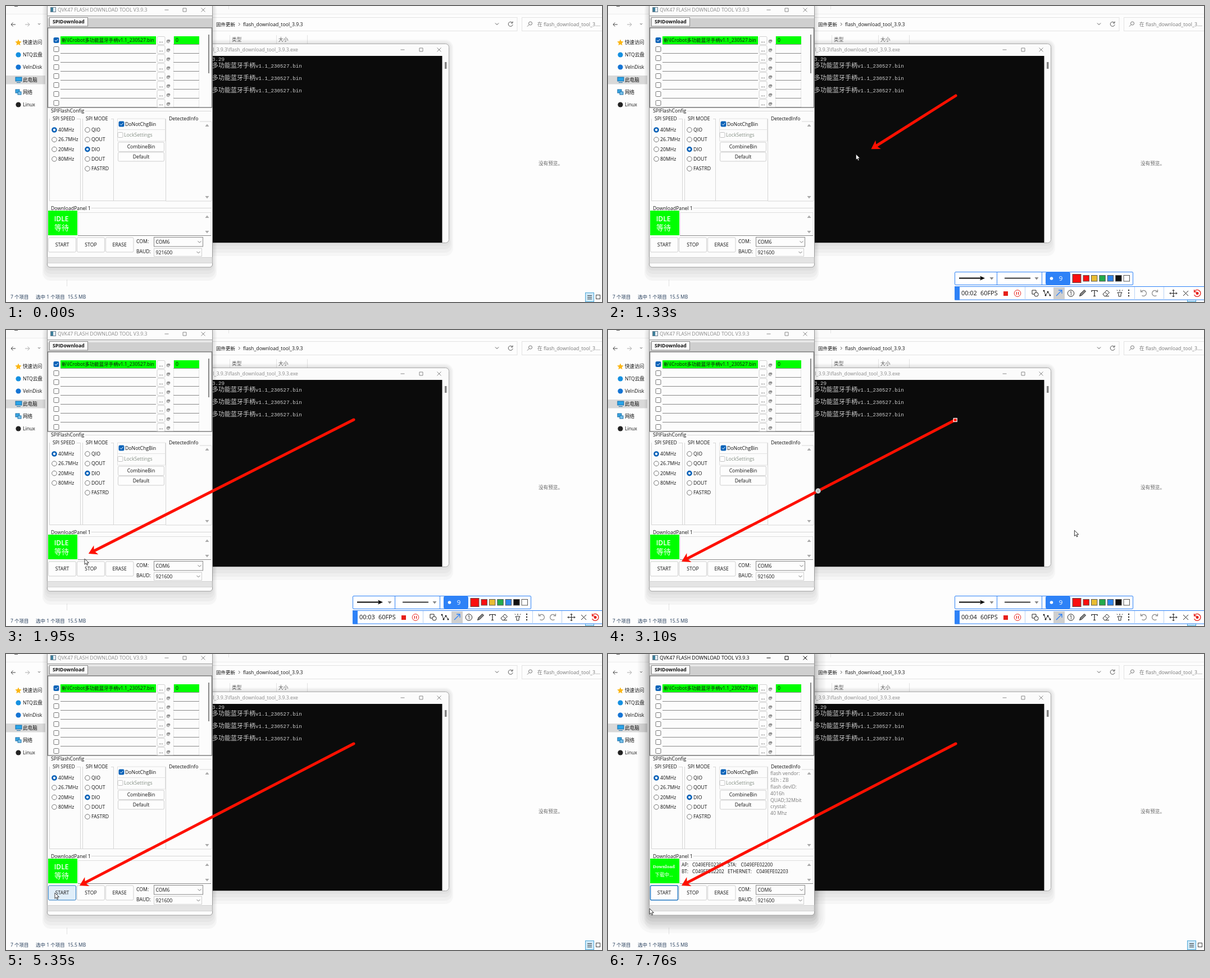
These frames come from a looping animation (1061x528 px, 8000 ms). An HTML page:

```html
<!DOCTYPE html>
<html lang="zh">
<head>
<meta charset="utf-8">
<title>Flash download</title>
<style>
html, body { margin: 0; width: 100%; height: 100%; overflow: hidden; background: #fdfdfd; }
svg { display: block; width: 100vw; height: 100vh; }
text { font-family: "Open Sans", "Noto Sans CJK SC", "Noto Sans CJK", sans-serif; white-space: pre; }
.mono { font-family: "Liberation Mono", "Noto Sans CJK SC", "Noto Sans CJK", monospace; }
.serif { font-family: "Noto Serif", "Noto Sans CJK SC", "Noto Sans CJK", serif; }
</style>
</head>
<body>
<svg id="stage" viewBox="0 0 1061 528"></svg>
<script>
const LOOP = 8000;
const RED = '#fe1000', BLUE = '#0a62b8', GREEN = '#00ff00', TOOL_BLUE = '#2e82f7';

// Drawing helpers; text is placed by its vertical centre.
const attrs = o => Object.entries(o).map(([k, v]) => ` ${k}="${v}"`).join('');
const rect = (x, y, w, h, fill = 'none', stroke = 'none', o = {}) =>
  `<rect${attrs({ x, y, width: w, height: h, fill, stroke, ...o })}/>`;
const text = (x, y, s, o = {}) => {
  const size = o['font-size'] || 8.7;
  return `<text${attrs({ x, y: y + size * 0.36, 'font-size': size, fill: '#111', ...o })}>${s}</text>`;
};
const path = (d, stroke = '#333', o = {}) =>
  `<path${attrs({ d, stroke, fill: 'none', 'stroke-width': 1, ...o })}/>`;
const dot = (x, y, r, fill, stroke = 'none', o = {}) =>
  `<circle${attrs({ cx: x, cy: y, r, fill, stroke, ...o })}/>`;
const group = (id, s, o = {}) => `<g${attrs({ id, ...o })}>${s}</g>`;
const range = n => [...Array(n).keys()];
const mid = { 'text-anchor': 'middle' };
const grey = { fill: '#777' };

const chevron = (x, y, c = '#555', r = 3) => path(`M${x - r} ${y - r / 2}l${r} ${r}l${r} ${-r}`, c);
const triangle = (x, y, dir, c = '#aaa') =>
  path(`M${x - 3.5} ${y + 2 * dir}h7l-3.5 ${-4.5 * dir}z`, 'none', { fill: c });
const windowButtons = (xs, y, c) =>
  path(`M${xs[0] - 3.5} ${y}h7M${xs[1] - 3} ${y - 3}h6v6h-6zM${xs[2] - 3.5} ${y - 3.5}l7 7m0 -7l-7 7`, c);
const shadow = (x, y, w, h, n, side, drop, alpha) => range(n).map(i => {
  const s = side * (i + 1), d = drop * (i + 1);
  return rect(x - s, y - s, w + 2 * s, h + s + d, '#000', 'none', { rx: 6 + s, 'fill-opacity': alpha });
}).join('');
const check = (x, y, on, c = '#666') =>
  rect(x - 4.5, y - 4.5, 9, 9, on ? BLUE : '#fff', on ? BLUE : c, { rx: 1.5, 'stroke-width': 0.9 }) +
  (on ? path(`M${x - 2.5} ${y}l2 2l3.5 -4`, '#fff') : '');
const radio = (x, y, label, on) =>
  dot(x, y, on ? 3.5 : 4.3, '#fff', on ? BLUE : '#666', { 'stroke-width': on ? 2.7 : 0.9 }) + text(x + 7, y, label);
const button = (x, y, w, h, label, id = '') =>
  rect(x, y, w, h, '#fdfdfd', '#cfcfcf', { rx: 2, id }) + text(x + w / 2, y + h / 2, label, mid);
const combo = (x, y, w, h, label, c) =>
  rect(x, y, w, h, '#fdfdfd', c) + text(x + 3, y + h / 2, label) + chevron(x + w - 6, y + h / 2, '#777');

function explorer() {
  const places = ['快速访问', 'NTQ云盘', 'VelnDisk', '此电脑', '网络', 'Linux'];
  const icons =
    path('M22 59.5l1.7 3.6l4 .5l-3 2.7l.8 4l-3.5 -2l-3.5 2l.8 -4l-3 -2.7l4 -.5z', 'none', { fill: '#fbb615' }) +
    dot(22, 87, 4.6, '#1590e0') + dot(22, 109, 4.6, '#1474d4') +
    rect(17, 127, 11, 7, '#2aa4e8', '#1b6fa8') + path('M19 136.5h7', '#1b6fa8') +
    rect(17, 149, 7, 6, '#39a7e4', '#1b6fa8') + rect(21, 153, 6, 5, '#7cc4ec', '#1b6fa8') +
    dot(22, 176, 4.6, '#222');
  return rect(0, 0, 1061, 528, '#fdfdfd') + rect(0, 0, 1061, 14, '#fbfbfb') + path('M0 14.5H1061', '#ececec') +
    rect(15, 0, 6, 1, '#555') + path('M396.5 0v6M108.5 488v12', '#e4e4e4') +
    path('M17 33H9m3.5 -3.5l-3.5 3.5l3.5 3.5', '#444') + path('M34 33h8m-3.5 -3.5l3.5 3.5l-3.5 3.5', '#aaa') + chevron(59, 32, '#666', 2) +
    rect(76, 20.5, 834, 24, '#fdfdfd', '#e2e2e2') + rect(918.5, 20.5, 150, 24, '#fdfdfd', '#e2e2e2') +
    text(374, 32.5, '固件更新', { 'font-size': 8.5 }) + path('M414 30l2.5 2.5l-2.5 2.5', '#555') +
    text(422, 32.5, 'flash_download_tool_3.9.3') + chevron(874, 32) +
    path('M901.5 30a4 4 0 1 0 .7 3M902 27.5v3h-3', '#555') +
    dot(933.5, 31, 3, 'none', '#777') + path('M931.3 33.3l-3.3 3.3', '#777') +
    text(946, 32.5, '在 flash_download_tool_3....', grey) +
    text(402, 60, '类型', { fill: '#555' }) + text(485, 60, '大小', { fill: '#555' }) +
    path('M398.5 52v16M481.5 52v16M536.5 52v16', '#e2e2e2') +
    rect(0, 124, 70, 15.5, '#d9d9d9') + icons +
    places.map((s, i) => text(30, 65 + 22.2 * i, s, { 'font-size': 8.6 })).join('') +
    text(948, 281, '没有预览。', { fill: '#666', 'font-size': 8.6 }) +
    ['7 个项目', '选中 1 个项目', '15.5 MB'].map((s, i) => text([8, 53, 110][i], 519, s, { fill: '#1c3554', 'font-size': 8.5 })).join('') +
    rect(1031.5, 511.5, 15, 16, '#cfe9f8', '#4fa8d8') + path('M1035 516.5h8m-8 3h8m-8 3h8', '#333') +
    rect(1050.5, 515.5, 7, 7, '#fff', '#444');
}

function consoleWindow() {
  const line = y => `<text class="mono" x="367" y="${y}" fill="#ccc" font-size="11">多功能蓝牙手柄<tspan font-size="9.2">v1.1_230527.bin</tspan></text>`;
  return shadow(300, 68, 488, 354, 4, 2, 6, 0.028) +
    rect(300, 67.5, 488.5, 355, '#fbfbfb', '#aaa', { rx: 6 }) + rect(300, 89, 476.5, 333, '#0b0b0b') +
    text(520, 78, 'l_3.9.3\\flash_download_tool_3.9.3.exe', { fill: '#888', 'text-anchor': 'end' }) +
    windowButtons([706, 739, 771], 78, '#888') + rect(781, 100, 3.5, 12, '#858585') +
    text(367, 95, '3.29', { class: 'mono', fill: '#ccc', 'font-size': 9.2 }) + [109.5, 131.5, 153.5].map(line).join('');
}

function fileRows() {
  return range(8).map(i => {
    const y = 61 + 16 * i;
    return check(89.5, y, i === 0) + path(`M97 ${y + 7.5}h170M298 ${y + 7.5}h46`, '#888') +
      path(`M298.5 ${y - 7}v14M343.5 ${y - 7}v14`, '#e4e4e4') +
      rect(269, y - 6.5, 14, 14, '#fdfdfd', '#d0d0d0', { rx: 2 }) + text(276, y + 0.5, '...', mid) +
      text(289, y + 1, '@', { ...mid, 'font-size': 8 });
  }).join('') + rect(97, 54, 170, 14, GREEN) + rect(299, 54, 45, 14, GREEN) +
    text(99, 61, '新\\ICrobot多功能蓝牙手柄v1.1_230527.bin', { 'font-size': 8.5 }) + text(302, 61, '0');
}

function toolWindow() {
  const speeds = ['40MHz', '26.7MHz', '20MHz', '80MHz'], modes = ['QIO', 'QOUT', 'DIO', 'DOUT', 'FASTRD'];
  const info = ['flash vendor:', '5Eh : ZB', 'flash devID:', '4016h', 'QUAD;32Mbit', 'crystal:', '40 Mhz'];
  const macs = [['AP:', 'C049EFE02201', 'STA:', 'C049EFE02200'], ['BT:', 'C049EFE02202', 'ETHERNET:', 'C049EFE02203']];
  const white = { ...mid, fill: '#fff' };
  const tab =
    rect(74, 17, 293, 22, '#cfcfcf') + path('M74 17.5h293', '#9a9a9a') + rect(74, 18, 293, 4, '#e8e8e8') +
    rect(77.5, 20.5, 68, 15.5, '#fafafa', '#8a8a8a') + text(83, 28, 'SPIDownload', { 'font-weight': 700 }) +
    `<clipPath id="list"><rect x="74" y="39" width="293" height="142"/></clipPath>` +
    rect(74.5, 39, 292, 142, '#fcfcfc', '#777', { 'stroke-width': 1.4 }) +
    `<g clip-path="url(#list)">${fileRows()}</g>` + rect(360, 51, 2, 69, '#888');
  const config =
    path('M141 187.5H366M77.5 201V347.5H285M132.5 201V347M136.5 201V347M191.5 201V347M284.5 201V348H366V206H345M126 201.5h6M187 201.5h4', '#d6d6d6') +
    text(80, 187, 'SPIFlashConfig') + text(83, 201, 'SPI SPEED', { 'font-size': 8.5 }) +
    text(142, 201, 'SPI MODE', { 'font-size': 8.5 }) + text(290, 201, 'DetectedInfo') +
    speeds.map((s, i) => radio(86, 221 + 17.3 * i, s, i === 0)).join('') +
    modes.map((s, i) => radio(145, 221 + 17.3 * i, s, i === 2)).join('') +
    path('M198.5 201h85v19.5h-85zM198.5 220.5h85V241h-85z', '#e2e2e2') +
    check(205.5, 210.5, true) + text(212, 210.5, 'DoNotChgBin') +
    check(203.5, 230, false, '#bbb') + text(210, 230, 'LockSettings', { fill: '#859085' }) +
    button(199.5, 243, 82, 16.5, 'CombineBin') + button(199.5, 261, 82, 16, 'Default') +
    triangle(358, 213, 1) + triangle(358, 341, -1) +
    group('info', info.map((s, i) => text(289, 213 + 11.85 * i, s, { fill: '#7a7a7a' })).join(''));
  const download =
    path('M152 360.5H366', '#d6d6d6') + text(80, 360.5, 'DownloadPanel 1') +
    rect(128.5, 368.5, 236.5, 41, '#fcfcfc', '#ddd') + path('M128 409.5H365', '#888') +
    triangle(358, 376, 1) + triangle(358, 403, -1) + rect(75, 365, 52, 44, GREEN) +
    group('idle', text(98.5, 380, 'IDLE', { ...white, 'font-size': 12, 'font-weight': 600 }) + text(99, 395, '等待', { ...white, 'font-size': 13 })) +
    group('sync', text(100.5, 380.5, 'SYNC', { ...white, 'font-size': 12, 'font-weight': 600 }) + text(101.5, 394, '等待上电同步', { ...mid, class: 'serif', 'font-size': 6.6 })) +
    group('loading', text(99.5, 379, 'Download', { ...white, class: 'serif', 'font-size': 7.6, 'font-weight': 600 }) + text(99.5, 394, '下载中...', { ...white, class: 'serif', 'font-size': 8.6 })) +
    group('macs', macs.map((row, r) => row.map((s, i) => text([131, 150, 213, r ? 264 : 236.5][i], 376.5 + 12 * r, s, { 'font-size': 8.3 })).join('')).join('')) +
    button(75.5, 413, 49, 26, 'START', 'start') + button(126.5, 413, 49, 26, 'STOP') + button(177.5, 413, 49.5, 26, 'ERASE') +
    text(232, 420, 'COM:') + combo(263.5, 412.5, 87, 16.5, 'COM6', '#888') +
    text(232, 438, 'BAUD:') + combo(263.5, 432.5, 85, 14, '921600', '#d0d0d0') +
    rect(74, 448.5, 293, 10, '#e4e4e4', '#d2d2d2');
  return shadow(73, 0, 294, 466, 4, 2, 6, 0.03) +
    group('focus', shadow(73, 0, 294, 466, 6, 3.3, 5.3, 0.025)) +
    rect(73.5, -8, 294, 474, '#fcfcfc', '#999', { rx: 5 }) +
    rect(79.5, 2.5, 9, 8, '#e8eef4', '#6a7f8e') + rect(80, 3, 4, 7, '#3c7f9c') +
    group('title', text(92, 7, 'QVK47 FLASH DOWNLOAD TOOL V3.9.3', { fill: 'currentColor' }) + windowButtons([286, 318, 351], 7, 'currentColor')) +
    tab + config + download;
}

function toolbar() {
  const colors = ['#fb0f0f', '#e9bd32', '#22ac4c', '#2f86ee', '#111', '#fff'];
  const options =
    rect(617.5, 474.5, 317, 23, '#fff', TOOL_BLUE, { rx: 1.5 }) +
    path('M625 485.5h40', '#000', { 'stroke-width': 2 }) + path('M671 485.5l-9 -4l2 4l-2 4z', 'none', { fill: '#000' }) +
    path('M706 485.5h46', '#000', { 'stroke-width': 1.6 }) + triangle(683, 486, -1, '#888') + triangle(763, 486, -1, '#888') +
    path('M692.5 475v22M772.5 475v22', TOOL_BLUE) + rect(779, 475, 44, 22, TOOL_BLUE, 'none', { rx: 2 }) +
    dot(789.5, 486, 2.8, '#fff') + text(806, 486, '9', { ...mid, fill: '#fff', 'font-size': 11.5 }) +
    rect(827, 478.5, 15, 15, '#fb0f0f', '#555') +
    colors.map((c, i) => rect(846 + 14.4 * i, 480.5, 10.5, 10.5, c, '#555')).join('');
  const icons =
    path('M755 507h7v7h-7zM776 507l3 9l4 -6l4 6M776 507v2', '#222') + dot(762.5, 514.5, 3.6, '#fff', '#222') +
    [[776, 508], [779, 516], [783, 510], [787, 516]].map(p => dot(...p, 1.5, '#222')).join('') +
    group('pick', rect(793, 502, 20, 21, '#cfcfcf')) +
    group('arrowIcon', path('M798 517l10 -10m-6 0h6v6', 'currentColor', { 'stroke-width': 1.3 })) +
    dot(824, 512.5, 5.7, '#fff', '#222') + text(824, 512.5, '1', { ...mid, 'font-size': 9 }) +
    path('M839.5 517.5l1.5 -4.5l7 -6.5l2.5 2.5l-7 7z', '#222', { fill: '#888' }) +
    path('M861 510v-2.5h10v2.5M866 507.5v10M864 517.5h4', '#222', { 'stroke-width': 1.2 }) +
    path('M881 514l7 -7l4.5 4l-6 6.5h-3zM884.5 510.5l4.5 4M886 517.5h6', '#222') +
    path('M907 511h8l-2 3v4h-4v-4zM911 509v-3M907 508l-1 -1.5M915 508l1 -1.5', '#222') +
    [507, 512, 517].map(y => dot(927, y, 1.2, '#222')).join('') +
    path('M948.5 506v4h4M949 510a5 5 0 1 1 1.5 6.5M978.5 506v4h-4M978 510a5 5 0 1 0 -1.5 6.5', '#888', { 'stroke-width': 1.2 }) +
    path('M1000 512.5h13M1006.5 506v13M1002 510.5l-2 2l2 2m9 -4l2 2l-2 2m-6.5 -6.5l2 -2l2 2m-4 9l2 2l2 -2M1024 508l9 9m0 -9l-9 9', '#222') +
    dot(1049, 512.5, 2.5, '#e6201a') + path('M1044 509a6 6 0 1 1 -.5 6M1043.5 506v4h4', '#e6201a', { 'stroke-width': 1.3 });
  return group('options', options) + rect(617.5, 500.5, 446, 23.5, '#fff', TOOL_BLUE, { rx: 1.5 }) +
    rect(617, 500, 9, 24.5, TOOL_BLUE) + text(629, 512.5, '00:01', { id: 'clock', 'font-size': 10.9 }) +
    text(663, 512.5, '60FPS', { 'font-size': 10.9 }) + rect(704, 509, 8, 8, '#e6201a') +
    dot(729, 512.5, 5.8, '#fff', '#e6201a') + path('M727.3 510v5M730.7 510v5', '#e6201a', { 'stroke-width': 1.3 }) +
    path('M742.5 501v23M937.5 501v23M989.5 501v23', '#b9d3f5') + icons;
}

document.getElementById('stage').innerHTML =
  explorer() + consoleWindow() + toolWindow() +
  group('arrow', path('', RED, { id: 'shaft', 'stroke-width': 5, 'stroke-linecap': 'round' }) + path('', 'none', { id: 'head', fill: RED })) +
  group('handles', rect(615.2, 157.5, 6, 6, RED, '#fff', { 'stroke-width': 1.2 }) +
    dot(374, 287, 4.6, '#888', '#777') + dot(374, 287, 3.6, '#bbb', '#fff')) +
  group('toolbar', toolbar()) +
  group('cursor', path('M0 0V10.2L2.4 8L4 11.6L5.7 10.9L4.1 7.4H7.4Z', '#222', { fill: '#fff', 'stroke-width': 0.9 }));

const ui = Object.fromEntries([...document.querySelectorAll('[id]')].map(e => [e.id, e]));

// Tracks of [ms, x, y], straight between points.
const START = { x: 619, y: 160 };
const cursorTrack = [
  [500, 803, 508], [900, 619, 160], [1000, 619, 160], [1150, 550, 201], [1330, 442, 264], [1700, 225, 372],
  [1950, 140, 408], [2250, 129, 413], [2550, 129, 413], [2900, 775, 212], [3100, 830, 357], [3230, 888, 408],
  [3380, 888, 408], [4140, 794, 514], [4600, 794, 514], [5350, 87, 426], [6560, 87, 426], [6830, 74, 450],
  [7610, 74, 450], [7760, 74, 454]
];
const tipTrack = [[1000, 619, 160], [1180, 555, 200], [1330, 469, 255], [1700, 250, 355], [1950, 147, 399], [2250, 131, 413]];

function along(track, t) {
  const i = track.findIndex(p => p[0] > t);
  if (i < 0) return track[track.length - 1].slice(1);
  if (i === 0) return track[0].slice(1);
  const [a, b] = [track[i - 1], track[i]], k = (t - a[0]) / (b[0] - a[0]);
  return [a[1] + (b[1] - a[1]) * k, a[2] + (b[2] - a[2]) * k];
}

const show = (el, on) => { el.style.display = on ? '' : 'none'; };

function drawArrow(t) {
  const [x, y] = along(tipTrack, t);
  const dx = START.x - x, dy = START.y - y, len = Math.hypot(dx, dy);
  show(ui.arrow, len > 16);
  if (len <= 16) return;
  const u = dx / len, v = dy / len;
  const at = (back, side) => `${(x + u * back - v * side).toFixed(1)} ${(y + v * back + u * side).toFixed(1)}`;
  ui.shaft.setAttribute('d', `M${START.x} ${START.y}L${at(11, 0)}`);
  ui.head.setAttribute('d', `M${at(0, 0)}L${at(15, 9)}L${at(11, 0)}L${at(15, -9)}Z`);
}

function render(t) {
  drawArrow(t);
  show(ui.handles, t >= 2550 && t < 4440);
  show(ui.toolbar, t >= 500 && t < 4700);
  show(ui.options, t < 4440);
  show(ui.pick, t < 4440);
  ui.arrowIcon.style.color = t < 4440 ? TOOL_BLUE : '#222';
  ui.clock.textContent = '00:0' + (1 + Math.floor((t + 400) / 1000));

  const focus = Math.min(1, Math.max(0, (t - 5410) / 200));
  const shade = Math.round(138 * (1 - focus));
  ui.focus.style.opacity = focus;
  ui.title.style.color = `rgb(${shade},${shade},${shade})`;

  const [cx, cy] = along(cursorTrack, t);
  const hover = t > 4700 && cx < 124 && cy < 439;
  ui.start.setAttribute('fill', hover ? '#e0eef9' : '#fdfdfd');
  ui.start.setAttribute('stroke', hover || t >= 5410 ? '#2479c4' : '#cfcfcf');
  ui.start.setAttribute('stroke-width', t >= 5410 ? 1.6 : 1);

  show(ui.idle, t < 5700);
  show(ui.sync, t >= 5700 && t < 7660);
  show(ui.loading, t >= 7660);
  show(ui.info, t >= 7610);
  show(ui.macs, t >= 7660);

  show(ui.cursor, t >= 500);
  ui.cursor.setAttribute('transform', `translate(${cx.toFixed(1)} ${cy.toFixed(1)})`);
}

const began = performance.now();
function tick() {
  render((performance.now() - began) % LOOP);
  requestAnimationFrame(tick);
}
tick();
</script>
</body>
</html>
```
